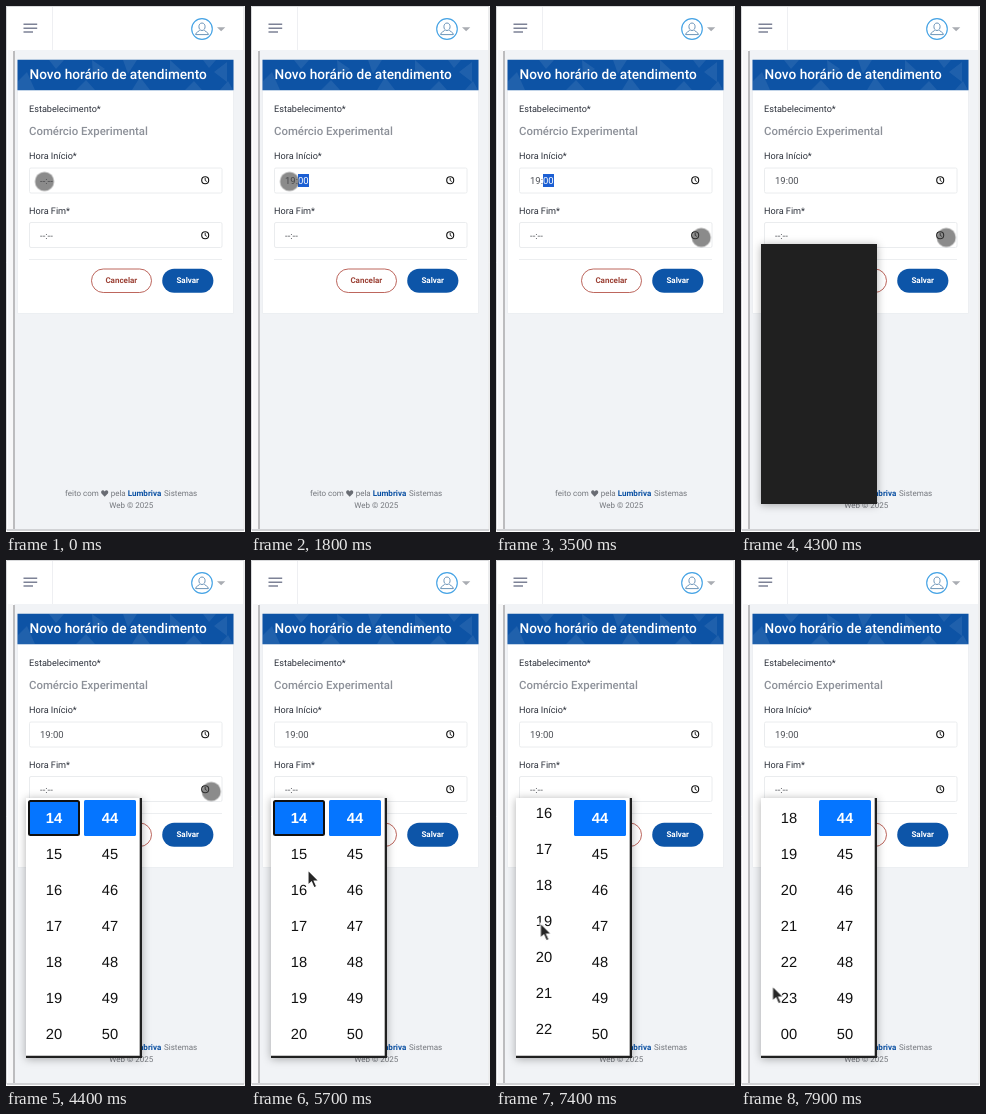
These frames come from a looping animation (239x526 px, 8 s). An HTML page:

```html
<!DOCTYPE html>
<html lang="pt-BR">
<head>
<meta charset="utf-8">
<title>Novo horário de atendimento</title>
<style>
  html, body { margin: 0; width: 100%; height: 100%; overflow: hidden; background: #fff; }
  svg { display: block; width: 239px; height: 526px; }
  text, .strip { font-family: Roboto, Arial, sans-serif; }
  text { text-rendering: geometricPrecision; }

  .label { font-size: 9.15px; fill: #2c313b; }
  .small { font-size: 8px; fill: #74777d; }
  .button { font-size: 8px; font-weight: 600; text-anchor: middle; }
  .box { fill: #fff; stroke: #eaecee; }
  .cell { font: 14.7px "Liberation Sans", Arial, sans-serif; text-anchor: middle; fill: #111; }
  .picked { font-weight: 700; fill: #fff; }

  .strip div { height: 13px; font-size: 9.5px; line-height: 13px; color: #4c4f55; white-space: pre; }
  .strip b { display: inline-block; height: 13px; margin-left: -.4px; padding: 0 .4px; font-weight: 400; background: #1c5fd3; color: #fff; }

  .strip, .touch, .popup, .list, .hours, .cursor {
    animation: 8s step-end -8ms infinite;
  }
  .strip { animation-name: typing; }
  .touch { animation-name: touch; }
  .popup { animation-name: popup; filter: drop-shadow(0 1px 4px rgba(0, 0, 0, .32)); }
  .list { animation-name: list; }
  .hours { animation-name: scroll; }
  .cursor { animation-name: cursor; }

  @keyframes typing {
    0% { transform: translateY(0); }
    6.25% { transform: translateY(-13px); }
    10% { transform: translateY(-26px); }
    12.5% { transform: translateY(-39px); }
    22.5% { transform: translateY(-52px); }
    53.75%, 100% { transform: translateY(-65px); }
  }
  @keyframes touch {
    0% { transform: translate(38.5px, 175.5px); visibility: visible; }
    31.25% { transform: translate(38.5px, 175.5px); animation-timing-function: steps(5); }
    37.5% { transform: translate(125px, 222px); animation-timing-function: steps(3); }
    41.25% { transform: translate(190px, 241px); animation-timing-function: steps(1); }
    42.5% { transform: translate(200px, 233px); }
    43.75%, 100% { transform: translate(205.3px, 231.5px); }
    63.75%, 100% { visibility: hidden; }
  }
  @keyframes popup {
    0% { visibility: hidden; }
    53.75%, 100% { visibility: visible; }
  }
  @keyframes list {
    0% { visibility: hidden; }
    55%, 100% { visibility: visible; }
  }
  @keyframes scroll {
    0% { transform: translateY(0); }
    83.75% { transform: translateY(-5px); }
    85% { transform: translateY(-47px); }
    86.25% { transform: translateY(-72px); }
    92.5% { transform: translateY(-77px); }
    93.75% { transform: translateY(-119px); }
    95%, 100% { transform: translateY(-144px); }
  }
  @keyframes cursor {
    0% { transform: translate(106px, 262px); visibility: hidden; }
    67.5% { transform: translate(106px, 262px); visibility: visible; animation-timing-function: steps(3); }
    71.25% { transform: translate(57px, 310px); animation-timing-function: steps(2); }
    73.75% { transform: translate(39px, 343px); animation-timing-function: steps(2); }
    76.25% { transform: translate(52px, 351px); }
    90% { transform: translate(51px, 352px); }
    91.25% { transform: translate(51px, 352px); animation-timing-function: steps(3); }
    95% { transform: translate(31px, 385px); animation-timing-function: steps(3); }
    98.75%, 100% { transform: translate(31.5px, 426px); visibility: visible; }
  }
</style>
</head>
<body>
<svg viewBox="0 0 239 526" xmlns="http://www.w3.org/2000/svg">
  <defs>
    <clipPath id="listClip"><path d="M20 240H134V495.5H20z"/></clipPath>
    <clipPath id="titleClip"><path d="M12 54H227V84H12z"/></clipPath>
    <g id="clock" fill="none" stroke="#111">
      <circle r="3.5" stroke-width="1.1"/>
      <path d="M0 -2.3V.2L1.6 1.2" stroke-width=".9"/>
    </g>
  </defs>

  <!-- page -->
  <path d="M0 0H239V526H0z" fill="#fff"/>
  <path d="M8 44H237V523H8z" fill="#f1f3f6"/>
  <path d="M2 44H7V523H2z" fill="#f7f7f8"/>
  <path d="M7 45H9V523H7z" fill="#bcbcbe"/>
  <path d="M.5 .5H238V524H.5z" fill="none" stroke="#d9dadc"/>
  <path d="M1 524H238" stroke="#c9cacc" stroke-width="1.5"/>

  <!-- top bar -->
  <path d="M46.5 1V44" stroke="#eeeff2"/>
  <path d="M17.5 18.2H31.2M17.5 22.2H31.2M17.5 26H27" stroke="#7d8296" stroke-width="1.5"/>
  <g fill="none" stroke="#45a3e5">
    <circle cx="196" cy="23" r="10.3" stroke-width="1.15"/>
    <path d="M196 17c4.2 0 4 7.5 0 7.5s-4.2-7.500 0-7.500zM193.600 24.200c-.3 1.500-3.700 1.500-4 4.400h12.800c-.3-2.900-3.700-2.900-4-4.400" stroke="#6c94b8"/>
  </g>
  <path d="M211 21.200H219.300L215.150 25.300z" fill="#a9acb2"/>

  <!-- card -->
  <path d="M11.500 54H227.500V307.500H11.500z" fill="#fff" stroke="#eaecf0" stroke-width=".8"/>
  <path d="M11.500 53.700H227.500V84.300H11.500z" fill="#0d53a5"/>
  <g clip-path="url(#titleClip)" fill="#fff" fill-opacity=".08">
    <path d="M12 75l9-9 8 18H12zM43 54h15l-8 9zM86 54l13 9-12 8zM70 84l10-10 9 10zM117 54h14l-9 14zM126 84l8-13 10 13zM164 54l12 11-12 9zM179 84l9-9 8 9z"/>
    <path d="M208 66l13-10v20zM197 54h13l-7 8zM214 84l8-9 5 9z"/>
  </g>
  <text x="23.500" y="73.300" font-size="13.650" font-weight="500" fill="#fff">Novo horário de atendimento</text>
  <text class="label" x="23" y="106">Estabelecimento*</text>
  <text x="23" y="129" font-size="11.400" font-weight="500" fill="#8d9199">Comércio Experimental</text>
  <text class="label" x="23" y="153">Hora Início*</text>
  <text class="label" x="23" y="208">Hora Fim*</text>

  <rect class="box" x="23.500" y="162" width="192.500" height="25" rx="1.500"/>
  <rect class="box" x="23.500" y="216.500" width="192.500" height="25" rx="1.500"/>
  <use href="#clock" x="199.200" y="174.300"/>
  <use href="#clock" x="199.200" y="229.200"/>
  <foreignObject x="34" y="168" width="40" height="13" style="overflow:hidden">
    <div xmlns="http://www.w3.org/1999/xhtml" class="strip">
      <div>--:--</div>
      <div><b>--</b>:--</div>
      <div><b>01</b>:--</div>
      <div>19:<b>--</b></div>
      <div>19:<b>00</b></div>
      <div>19:00</div>
    </div>
  </foreignObject>
  <text x="34" y="232.700" font-size="9.500" fill="#4c4f55">--:--</text>

  <path d="M23 253.500H216" stroke="#eceef0"/>
  <rect x="85.500" y="263" width="60" height="23.500" rx="11.750" fill="#fff" stroke="#bd665d"/>
  <text class="button" x="115.300" y="277.300" fill="#9c4236">Cancelar</text>
  <rect x="156.200" y="262.700" width="51.200" height="24" rx="12" fill="#0d55a8"/>
  <text class="button" x="181.700" y="277.300" fill="#fff">Salvar</text>

  <!-- footer -->
  <text class="small" x="59" y="490">feito com</text>
  <path d="M98.700 490.800l-3.200-3.300c-1.600-2.900 1.900-4.500 3.200-2.100 1.300-2.400 4.800-.8 3.200 2.100z" fill="#696c73"/>
  <text class="small" x="104.700" y="490">pela</text>
  <text class="small" x="121.700" y="490" style="font-weight:700;fill:#0a50a3">Lumbriva</text>
  <text class="small" x="158" y="490">Sistemas</text>
  <text class="small" x="103.200" y="502">Web © 2025</text>

  <g class="touch">
    <circle r="9.500" fill="#444" fill-opacity=".62"/>
  </g>

  <!-- time picker -->
  <g class="popup">
    <path d="M20 238H136V498H20z" fill="#202020"/>
    <g class="list">
      <path d="M20 238H133.700V495.700H20z" fill="#fff"/>
      <g clip-path="url(#listClip)">
        <g class="hours" id="hours">
          <rect x="23" y="241" width="50" height="34" rx="1.500" fill="#0575ff" stroke="#101010" stroke-width="2"/>
        </g>
        <g id="minutes">
          <rect x="78" y="240" width="52" height="36" rx="1.500" fill="#0575ff"/>
        </g>
      </g>
    </g>
  </g>

  <g class="cursor">
    <path d="M0 0V15.200L3.500 12L6 17.800L8.700 16.600L6.200 11H11z" fill="#262626" stroke="#fff" stroke-width="1.100"/>
  </g>
</svg>
<script>
  const ROW = 36;

  function fillColumn(id, x, first, wrap, count) {
    const column = document.getElementById(id);
    for (let i = 0; i < count; i++) {
      const cell = document.createElementNS("http://www.w3.org/2000/svg", "text");
      cell.setAttribute("class", i ? "cell" : "cell picked");
      cell.setAttribute("x", x);
      cell.setAttribute("y", 263 + i * ROW);
      cell.textContent = String((first + i) % wrap).padStart(2, "0");
      column.append(cell);
    }
  }

  fillColumn("hours", 48, 14, 24, 12);
  fillColumn("minutes", 104, 44, 60, 8);
</script>
</body>
</html>
```
